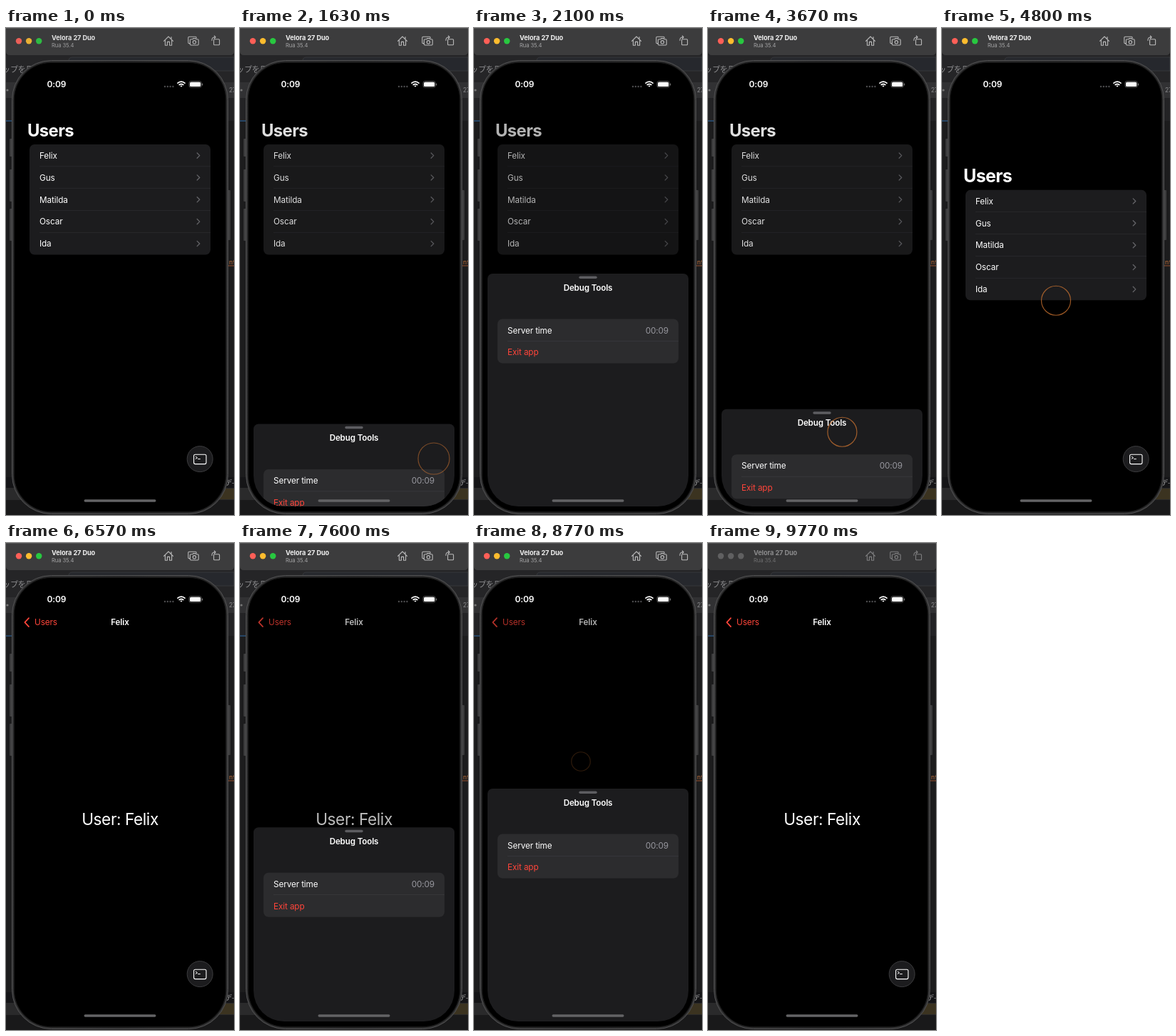
An HTML page for the animation above (9.84 s loop, 320 by 682 pixels).

```html
<!DOCTYPE html>
<html lang="en">
<head>
<meta charset="utf-8">
<title>Debug tools demo</title>
<style>
html, body { margin: 0; width: 100%; height: 100%; overflow: hidden; background: #1c1c1d; }
svg { display: block; width: 100vw; height: 100vh; }
text { font: 11.75px Inter, "Liberation Sans", sans-serif; letter-spacing: -.01em; fill: #fff; }
.mid { text-anchor: middle; }
.semi { font-weight: 600; font-size: 11.6px; }
.big { font-weight: 700; font-size: 23.8px; letter-spacing: -.025em; }
.hero { font-size: 22.7px; letter-spacing: -.02em; }
.red { fill: #ff453a; }
.line { fill: none; stroke-linecap: round; stroke-linejoin: round; }
.cjk { font: 11px "Noto Sans CJK JP", "Noto Sans CJK", sans-serif; fill: #8c8c8e; }
.code { font: 8.5px "Noto Sans Mono", monospace; fill: #c8753f; }
</style>
</head>
<body>
<svg viewBox="0 0 320 682" preserveAspectRatio="none">
  <defs>
    <clipPath id="screen"><rect x="19" y="55" width="282" height="615" rx="43"/></clipPath>
    <clipPath id="card"><rect x="33" y="163" width="254" height="154.5" rx="7"/></clipPath>
    <linearGradient id="metal" x2="1" y2="0">
      <stop offset="0" stop-color="#333334"/><stop offset=".5" stop-color="#262627"/><stop offset="1" stop-color="#333334"/>
    </linearGradient>
  </defs>

  <!-- desktop behind the device -->
  <rect width="320" height="682" fill="#1c1c1d"/>
  <rect y="38" width="320" height="38" fill="#252527"/>
  <path d="M320 41H93q-5 0-5 5v14H320z" fill="#26282d" stroke="#3e3f43" stroke-width=".7"/>
  <rect y="76" width="320" height="22" fill="#313133"/>
  <rect y="98" width="320" height="32" fill="#232325"/>
  <rect y="129.5" width="9" height="1.2" fill="#2a5f92"/>
  <text class="cjk" x="-5" y="61.5">ップを日</text>
  <circle cx="2" cy="87" r="1.6" fill="#777"/>
  <text x="313" y="90" style="font-size:8.5px;fill:#8a8a8c">27</text>
  <text class="code" x="313" y="331">nt</text>
  <rect x="312" y="332.5" width="8" height=".9" fill="#a8552f"/>
  <rect y="629" width="320" height="15" fill="#151517"/>
  <text class="cjk" x="308" y="640" style="font-size:9px;fill:#b0b0b0">デ-</text>
  <rect y="644" width="320" height="17" fill="#2a2a2b"/>
  <rect x="300" y="645" width="20" height="15" fill="#3b3320"/>
  <rect y="661" width="320" height="21" fill="#19191a"/>

  <g id="chrome"></g>
  <g id="idle"></g>

  <!-- device -->
  <g fill="#3d3d3e">
    <rect x="5" y="155" width="5" height="25" rx="1"/>
    <rect x="5" y="198" width="5" height="45" rx="1"/>
    <rect x="5" y="253" width="5" height="45" rx="1"/>
    <rect x="310" y="227" width="5" height="70" rx="1"/>
  </g>
  <rect x="8.5" y="45.5" width="303" height="635" rx="55" fill="url(#metal)" stroke="#515152"/>
  <rect x="11.4" y="48.4" width="297.2" height="629.2" rx="52" fill="#000" stroke="#161616" stroke-width="1.2"/>

  <g clip-path="url(#screen)">
    <g id="list">
      <g id="rows">
        <rect x="33" y="163" width="254" height="154.5" rx="7" fill="#1c1c1e"/>
        <rect id="press" x="33" y="163" width="254" height="30.9" fill="#3a3a3c" clip-path="url(#card)"/>
      </g>
    </g>
    <g id="detail">
      <rect x="19" y="55" width="282" height="615"/>
      <text class="hero mid" x="160" y="394.5">User: Felix</text>
    </g>
    <text id="heading" class="big" x="30" y="152.2">Users</text>
    <g id="back">
      <path class="line" d="M32 105.2L26.4 111.2L32 117.2" stroke="#ff453a" stroke-width="1.7"/>
      <text id="backText" class="red" x="40" y="115.4">Users</text>
    </g>
    <text id="navTitle" class="semi mid" x="160" y="115.4">Felix</text>
    <rect id="dim" x="19" y="92" width="282" height="578"/>
    <g id="button">
      <circle cx="272.2" cy="603.6" r="18" fill="#1c1c1e" stroke="#3c3c3e"/>
      <g class="line" stroke="#fff" stroke-width="1.1">
        <rect x="263.6" y="597.2" width="17.4" height="13.4" rx="2"/>
        <path d="M266.3 600.2L268.5 601.8L266.3 603.4M269.6 603.6H272.4" stroke-width="1"/>
      </g>
    </g>
    <g id="sheet">
      <rect x="19" y="344" width="282" height="420" rx="7" fill="#1c1c1e"/>
      <rect x="147.3" y="347.4" width="25.4" height="3.5" rx="1.75" fill="#5d5d61"/>
      <text class="semi mid" x="160" y="367.6">Debug Tools</text>
      <rect x="33" y="407.5" width="254" height="62" rx="7" fill="#2c2c2e"/>
      <rect x="47" y="438.1" width="240" height=".7" fill="#3c3c3f"/>
      <text x="47" y="427.6">Server time</text>
      <text x="273" y="427.6" text-anchor="end" style="fill:#98989f">00:09</text>
      <text class="red" x="47" y="458.4">Exit app</text>
    </g>
  </g>
  <rect x="109.5" y="660.2" width="101" height="3.5" rx="1.75" fill="#636365"/>

  <!-- status bar -->
  <text class="semi" x="57.5" y="83.2" style="font-size:12px">0:09</text>
  <g fill="#4c4c4e">
    <circle cx="223" cy="82" r="1.2"/><circle cx="226.8" cy="82" r="1.2"/>
    <circle cx="230.6" cy="82" r="1.2"/><circle cx="234.4" cy="82" r="1.2"/>
  </g>
  <g class="line" stroke="#fff" stroke-width="1.7" style="stroke-linecap:butt">
    <path d="M240.4 77.6Q246 72.8 251.6 77.6M242.6 79.9Q246 77.1 249.4 79.9"/>
    <path d="M244.4 81L246 82.8L247.6 81Q246 79.8 244.4 81z" fill="#fff" stroke="none"/>
  </g>
  <rect x="256.9" y="74.6" width="17.4" height="8.6" rx="2.6" fill="none" stroke="#777" stroke-width=".7"/>
  <rect x="258" y="75.7" width="15.2" height="6.4" rx="1.7" fill="#fff"/>
  <rect x="275.1" y="77.4" width="1.1" height="3" rx=".5" fill="#777"/>

  <circle id="ring" fill="none" stroke="#cf7530" stroke-width="1.2"/>
</svg>
<script>
const LOOP = 9840;
const $ = id => document.getElementById(id);
const set = (id, attrs) => { for (const k in attrs) $(id).setAttribute(k, attrs[k]); };
const move = (id, x, y) => set(id, { transform: `translate(${x} ${y})` });

// simulator title bar
function chrome(bar, lights, title, sub, icon) {
  return `<path d="M0 0H320V33q0 5-5 5H5q-5 0-5-5z" fill="${bar}"/>
    <rect width="320" height=".8" fill="#fff" opacity=".14"/>` +
    lights.map((c, i) => `<circle cx="${18 + 14.1 * i}" cy="18.2" r="4.2" fill="${c}"/>`).join('') +
    `<text x="64" y="17" style="font-size:9.2px;font-weight:700;fill:${title}">Velora 27 Duo</text>
    <text x="64" y="27" style="font-size:7.6px;fill:${sub}">Rua 35.4</text>
    <g class="line" stroke="${icon}" stroke-width="1.1">
      <path d="M221.5 18.4L228 12L234.5 18.4M223.4 17V24.2H226.4V19.4H229.6V24.2H232.6V17M232 15.5V12.5"/>
      <path d="M258 21.6H257q-1.2 0-1.2-1.2V13.4q0-1.2 1.2-1.2H266q1.2 0 1.2 1.2V14"/>
      <path d="M259.6 15.8H262L262.8 14.6H266.2L267 15.8H269q1.2 0 1.2 1.2V22.8q0 1.2-1.2 1.2H259.6q-1.2 0-1.2-1.2V17q0-1.2 1.2-1.2z"/>
      <circle cx="264.4" cy="19.8" r="2.2"/>
      <rect x="291.6" y="15.8" width="8" height="8" rx="1"/>
      <path d="M289 17.4Q288.6 12.8 294 12.8M292.4 11L294.2 12.8L292.4 14.6"/>
    </g>`;
}
$('chrome').innerHTML = chrome('#3c3c3d', ['#ff5f57', '#febc2e', '#28c840'], '#f0f0f0', '#a4a4a5', '#bababb');
$('idle').innerHTML = chrome('#373738', Array(3).fill('#606061'), '#8c8c8d', '#6f6f70', '#7f7f80');

const names = ['Felix', 'Gus', 'Matilda', 'Oscar', 'Ida'];
$('rows').insertAdjacentHTML('beforeend', names.map((name, i) => {
  const y = 163 + 30.85 * i;
  return `<text x="47" y="${y + 19.8}">${name}</text>
    <path class="line" d="M268.2 ${y + 12}L271.8 ${y + 15.6}L268.2 ${y + 19.2}" stroke="#636367" stroke-width="1.3"/>` +
    (i ? `<rect x="47" y="${y - .4}" width="240" height=".7" fill="#2d2d30"/>` : '');
}).join(''));

const linear = x => x;
const out = x => 1 - (1 - x) ** 3;
const glide = x => 1 - (1 + 8 * x) * Math.exp(-8 * x) * (1 - x);
const both = x => x * x * (3 - 2 * x);

// keys: [time, value, easing into this key]
function track(t, keys) {
  let [t0, v0] = keys[0];
  for (const [t1, v1, ease = linear] of keys) {
    if (t < t1) return t < t0 ? v0 : v0 + (v1 - v0) * ease((t - t0) / (t1 - t0));
    [t0, v0] = [t1, v1];
  }
  return v0;
}

const HIDDEN = 338;
const sheetKeys = [
  [1560, HIDDEN], [2100, 0, glide], [3245, 0], [3470, 151, both], [3610, 151],
  [3670, 189], [3870, HIDDEN], [7410, HIDDEN], [7970, 0, glide], [8850, 0], [9330, HIDDEN, glide]
];
const dimKeys = [
  [1560, 0], [2050, .3, glide], [3245, .3], [3470, .12, both], [4715, .12],
  [4760, 0], [7410, 0], [7920, .3, glide], [8850, .3], [9330, 0, glide]
];
const pullKeys = [[4710, 0], [4930, 80, out], [5130, 80], [5670, 0, glide]];
const pushKeys = [[6050, 0], [6570, 1, glide]];
const idleKeys = [[0, .12], [70, 0], [9769, 0], [9770, 1]];

// press time, release time, x, y over time
const touches = [
  [1500, 1590, 272, () => 603],
  [3240, 3700, 188.4, t => 376 + track(t, sheetKeys)],
  [4700, 5130, 160, t => track(t, [[4710, 250], [4930, 415, out]])],
  [5970, 6060, 150, () => 178],
  [7330, 7420, 272, () => 603],
  [8770, 8860, 150, () => 306]
];

function drawTouch(t) {
  const touch = touches.find(([a, b]) => t >= a && t < b + 150);
  if (!touch) return set('ring', { opacity: 0 });
  const [a, b, x, y] = touch;
  set('ring', {
    cx: x, cy: y(Math.min(t, b)),
    r: track(t, [[a, 13], [a + 85, 20.5, out], [b, 20.5], [b + 150, 26]]),
    opacity: track(t, [[a, .22], [a + 85, .75], [b, .75], [b + 150, 0]])
  });
}

function draw(t) {
  const pull = track(t, pullKeys), p = track(t, pushKeys), q = 1 - p;
  set('idle', { opacity: track(t, idleKeys) });
  move('list', -85 * p, pull);
  set('list', { opacity: p < 1 ? 1 - .3 * p : 0 });
  set('press', { opacity: t >= 6000 && t < 6570 ? 1 : 0 });
  move('detail', 282 * q, 0);

  // large heading shrinks into the back label
  const size = 1 + pull * .0008 - .5 * p;
  set('heading', {
    transform: `translate(${30 + 10 * p} ${152.2 + pull - 36.8 * p}) scale(${size}) translate(-30 -152.2)`,
    opacity: Math.max(0, 1 - 1.6 * p)
  });
  set('back', { opacity: Math.max(0, 2 * p - 1) });
  set('backText', { transform: `translate(40 ${115.4 + 36.8 * q}) scale(${1 + q}) translate(-40 -115.4)` });
  move('navTitle', 120 * q, 0);
  set('navTitle', { opacity: p * p });

  set('dim', { opacity: track(t, dimKeys) });
  move('sheet', 0, track(t, sheetKeys));
  drawTouch(t);
}

const start = performance.now();
function tick() {
  draw((performance.now() - start) % LOOP);
  requestAnimationFrame(tick);
}
tick();
</script>
</body>
</html>
```
